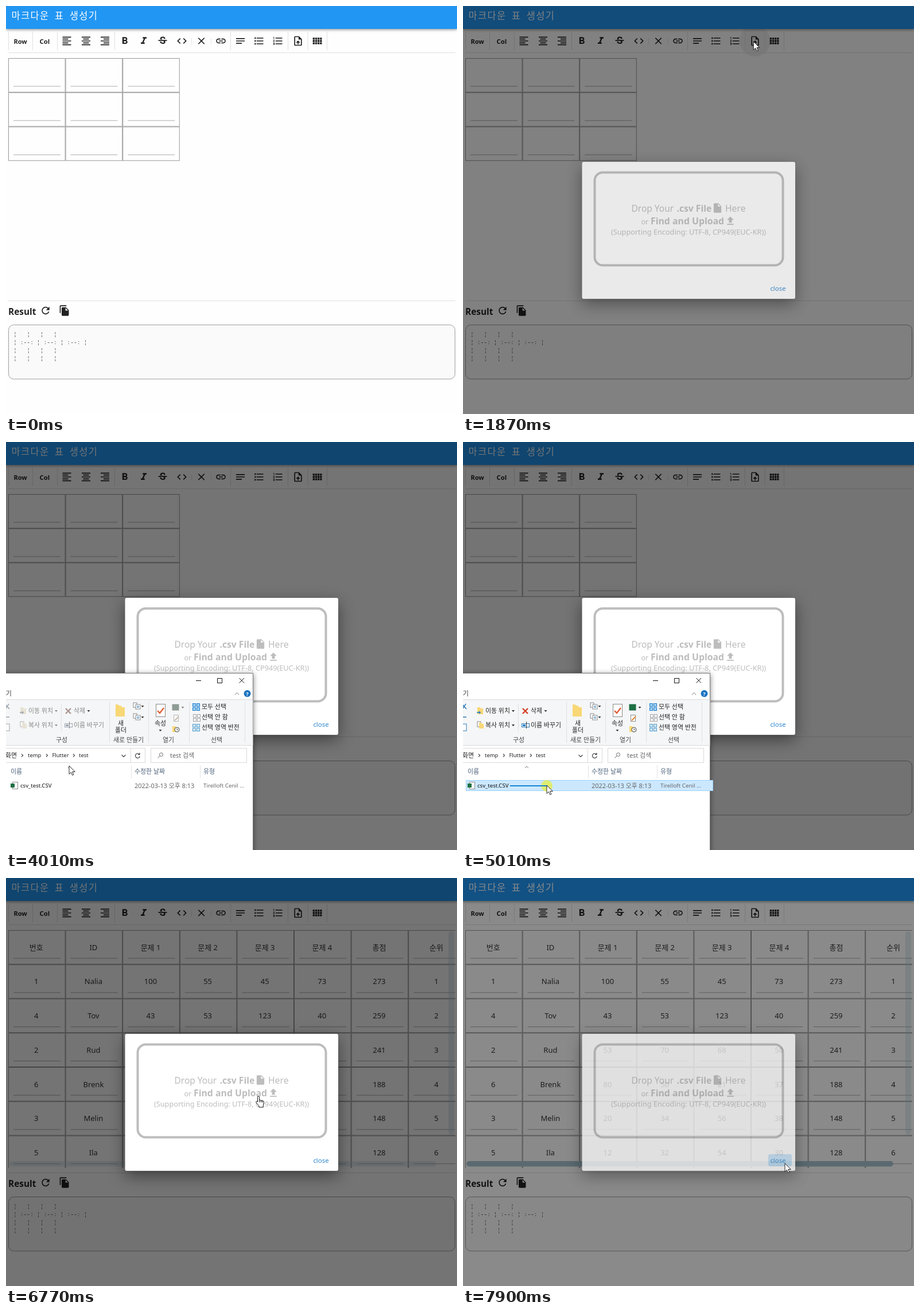
An HTML page that plays this animation: 786 px wide and 712 px high, repeating every 8 s.

```html
<!DOCTYPE html>
<html lang="ko">
<head>
<meta charset="utf-8">
<style>
  html, body { margin: 0; width: 100%; height: 100%; overflow: hidden; background: #fefefe; }
  svg { display: block; width: 100vw; height: 100vh; font-family: "Noto Sans", "Noto Sans CJK KR", sans-serif; }
  text { white-space: pre; }
  .bold { font-weight: 700; }
  .mid { text-anchor: middle; }
  .mono { font-family: "Noto Sans Mono", monospace; }
  .title { font-family: "Noto Sans CJK KR", sans-serif; letter-spacing: 1.3px; word-spacing: 3.5px; }
  .bar { filter: drop-shadow(0 2px 2px rgba(0,0,0,.35)); }
  .sheet { filter: drop-shadow(0 9px 14px rgba(0,0,0,.45)); }
  .frame { filter: drop-shadow(0 2px 5px rgba(0,0,0,.5)); }
  .label { fill: #888; }
  .tool { opacity: .6; filter: grayscale(.75); }
  .caption { stroke: #999; }
  .picked .label { fill: #222; }
  .picked .tool { opacity: 1; filter: none; }
  .active .caption { stroke: #111; }
</style>
</head>
<body>
<svg id="stage" viewBox="0 0 786 712"></svg>
<script>
const text = (x, y, size, str, cls = '', fill = '') =>
  `<text x="${x}" y="${y}" font-size="${size}" class="${cls}" ${fill && `fill="${fill}"`}>${str}</text>`;
const rect = (x, y, w, h, fill, attrs = '') =>
  `<rect x="${x}" y="${y}" width="${w}" height="${h}" fill="${fill}" ${attrs}/>`;
const line = (d, stroke, width = 1, attrs = '') =>
  `<path d="${d}" fill="none" stroke="${stroke}" stroke-width="${width}" ${attrs}/>`;
const shape = (d, fill, attrs = '') => `<path d="${d}" fill="${fill}" ${attrs}/>`;
const icon = (cx, cy, d) =>
  `<path transform="translate(${cx - 10} ${cy - 10}) scale(.833)" d="${d}"/>`;
const bars = list => list.map(([x, y, w, h = 2]) => `M${x} ${y}h${w}v${h}h${-w}z`).join('');
const group = (id, body, attrs = '') => `<g id="${id}" ${attrs}>${body}</g>`;

// ---- Page ----
const align = short => bars([0, 1, 2, 3, 4].map(i => i % 2 ? [short, 3 + 4 * i, 12] : [3, 3 + 4 * i, 18]));
const tools = [
  [106, align(3)], [139.5, align(6)], [172.5, align(9)],
  [207, 'M15.6 10.79c.97-.67 1.65-1.77 1.65-2.79 0-2.26-1.75-4-4-4H7v14h7.04c2.09 0 3.71-1.7 3.71-3.79 0-1.52-.86-2.82-2.15-3.42zM10 6.5h3c.83 0 1.5.67 1.5 1.5s-.67 1.5-1.5 1.5h-3v-3zm3.5 9H10v-3h3.5c.83 0 1.5.67 1.5 1.5s-.67 1.5-1.5 1.5z'],
  [240, 'M10 4v3h2.21l-3.42 8H6v3h8v-3h-2.21l3.42-8H18V4z'],
  [273, 'M6.85 7.08C6.85 4.37 9.45 3 12.24 3c1.64 0 3 .49 3.9 1.28.77.65 1.46 1.73 1.46 3.24h-3.01c0-.31-.05-.59-.15-.85-.29-.86-1.2-1.28-2.25-1.28-1.86 0-2.34 1.02-2.34 1.7 0 .48.25.88.74 1.21.38.25.77.48 1.41.7H7.39c-.21-.34-.54-.89-.54-1.92zM21 12v-2H3v2h9.62c1.15.45 1.96.75 1.96 1.97 0 1-.81 1.67-2.28 1.67-1.54 0-2.93-.54-2.93-2.51H6.4c0 .55.08 1.13.24 1.58.81 2.29 3.29 3.3 5.67 3.3 2.27 0 5.3-.89 5.3-4.05 0-.3-.01-1.16-.48-1.94H21V12z'],
  [306.5, 'M9.4 16.6L4.8 12l4.6-4.6L8 6l-6 6 6 6 1.4-1.4zm5.2 0l4.6-4.6-4.6-4.6L16 6l6 6-6 6-1.4-1.4z'],
  [340.5, 'M19 6.41L17.59 5 12 10.59 6.41 5 5 6.41 10.59 12 5 17.59 6.41 19 12 13.41 17.59 19 19 17.59 13.41 12z'],
  [374.5, 'M3.9 12c0-1.71 1.39-3.1 3.1-3.1h4V7H7c-2.76 0-5 2.24-5 5s2.24 5 5 5h4v-1.9H7c-1.71 0-3.1-1.39-3.1-3.1zM8 13h8v-2H8v2zm9-6h-4v1.9h4c1.71 0 3.1 1.39 3.1 3.1s-1.39 3.1-3.1 3.1h-4V17h4c2.76 0 5-2.24 5-5s-2.24-5-5-5z'],
  [408.5, bars([[3, 6, 18], [3, 11, 18], [3, 16, 12]])],
  [441, bars([5, 11, 17].flatMap(y => [[7, y, 14], [2.6, y - .4, 2.8, 2.8]]))],
  [474, 'M2 17h2v.5H3v1h1v.5H2v1h3v-4H2v1zm1-9h1V4H2v1h1v3zm-1 3h1.8L2 13.1v.9h3v-1H3.2L5 10.9V10H2v1z' + bars([[7, 5, 14], [7, 11, 14], [7, 17, 14]])],
  [509, 'M14 2H6c-1.1 0-1.99.9-1.99 2L4 20c0 1.1.89 2 1.99 2H18c1.1 0 2-.9 2-2V8l-6-6zm4 18H6V4h7v5h5v11zM8 15.01l1.41 1.41L11 14.84V19h2v-4.16l1.59 1.59L16 15.01 12.01 11z'],
  [543, bars([5, 10, 15].flatMap(y => [2, 7, 12, 17].map(x => [x, y, 4, 4])))],
];
const refreshIcon = 'M17.65 6.35C16.2 4.9 14.21 4 12 4c-4.42 0-7.99 3.58-7.99 8s3.57 8 7.99 8c3.73 0 6.84-2.55 7.73-6h-2.08c-.82 2.33-3.04 4-5.65 4-3.31 0-6-2.69-6-6s2.69-6 6-6c1.66 0 3.14.69 4.22 1.78L13 11h7V4l-2.35 2.35z';
const copyIcon = 'M16 1H4c-1.1 0-2 .9-2 2v14h2V3h12V1zm-1 4l6 6v10c0 1.1-.9 2-2 2H7.99C6.89 23 6 22.1 6 21V7c0-1.1.9-2 1.99-2h7zm-1 7h5.5L14 6.5V12z';
const fileIcon = 'M6 2c-1.1 0-1.99.9-1.99 2L4 20c0 1.1.89 2 1.99 2H18c1.1 0 2-.9 2-2V8l-6-6H6zm7 7V3.5L18.5 9H13z';
const uploadIcon = 'M9 16h6v-6h4l-7-7-7 7h4zm-4 2h14v2H5z';

const grid = rows => rows.map((row, r) => row.map((value, c) => {
  const x = 4.5 + 99.6 * c, y = 91.5 + 59.75 * r;
  return rect(x, y, 98.6, 58.75, 'none', 'stroke="#999"') +
    line(`M${x + 8.5} ${y + 48.7}h82`, '#bdbdbd', 1.2) +
    text(x + 48.3, y + 34, 13, value, 'mid', '#333');
}).join('')).join('');

const scores = [
  [1, 'Nalia', 100, 55, 45, 73], [4, 'Tov', 43, 53, 123, 40], [2, 'Rud', 53, 70, 68, 50],
  [6, 'Brenk', 80, 50, 21, 37], [3, 'Melin', 20, 34, 56, 38], [5, 'Ila', 12, 32, 54, 30],
];
const loaded = [
  ['번호', 'ID', '문제 1', '문제 2', '문제 3', '문제 4', '총점', '순위'],
  ...scores.map((row, i) => [...row, row.slice(2).reduce((a, b) => a + b), i + 1]),
];

const page =
  rect(0, 0, 786, 712, '#fefefe') +
  '<circle id="hover" cx="509" cy="61" r="27" opacity=".06"/>' +
  rect(0, -10, 786, 50, '#2196f3', 'class="bar"') +
  text(9.5, 23, 16.5, '마크다운 표 생성기', 'title', '#fff') +
  line('M4 81.5H783M4 514.5H783' + [4.5, 46.5, 89.5, 189.5, 391.5, 491.5, 526, 559.5].map(x => `M${x} 44v33`).join(''), '#e0e0e0') +
  line('M323.5 56v11M357.5 56v11', '#e4e4e4') +
  `<g fill="#212121">${text(13.5, 65.5, 11, 'Row', 'bold')}${text(58.5, 65.5, 11.3, 'Col', 'bold')}` +
  tools.map(([x, d]) => icon(x, 61, d)).join('') +
  text(4, 539, 15.4, 'Result', 'bold') + icon(69, 531.5, refreshIcon) + icon(102, 531.5, copyIcon) + '</g>' +
  group('empty', grid(Array(3).fill(['', '', '']))) +
  group('full', grid(loaded) +
    rect(771, 93, 10, 355, '#a5c4cf', 'rx="5" opacity=".3"') +
    rect(6, 494, 744, 9.5, '#a5c4cf', 'rx="5" id="scroll"'), 'clip-path="url(#view)"') +
  rect(4.5, 556.5, 778, 94.5, '#fafafa', 'rx="9" stroke="#9e9e9e"') +
  ['¦   ¦   ¦   ¦', '¦ :--: ¦ :--: ¦ :--: ¦', '¦   ¦   ¦   ¦', '¦   ¦   ¦   ¦']
    .map((row, i) => text(13, 575.5 + 14 * i, 9.73, row, 'mono', '#333')).join('');

// ---- Upload dialog ----
const dialog =
  rect(207.5, 272, 371.5, 239, '#fff', 'rx="3" class="sheet"') +
  rect(229.5, 290.5, 328, 162, 'none', 'rx="14" stroke="currentColor" stroke-width="4"') +
  '<g fill="currentColor">' +
  text(293.5, 358.5, 15.5, 'Drop Your') + text(372.5, 358.5, 15.7, '.csv File', 'bold') +
  icon(443.5, 352.5, fileIcon) + text(457, 358.5, 15.7, 'Here') +
  text(310.5, 381, 12.5, 'or') + text(327, 381, 15.8, 'Find and Upload', 'bold') + icon(466, 375, uploadIcon) +
  text(393, 399, 12.7, '(Supporting Encoding: UTF-8, CP949(EUC-KR))', 'mid') + '</g>' +
  rect(532, 482, 41, 21, '#2196f3', 'rx="3" id="press" opacity=".25"') +
  text(549, 497, 11.4, 'close', 'mid', '#2f87d0');

// ---- File window ----
const ko = (x, y, str, cls = '', fill = '#222') => text(x, y + 4, 10.9, str, cls, cls.includes('label') ? '' : fill);
const arrow = (x, y, cls = '') => shape(`M${x - 2.5} ${y - 1}h5l-2.5 3z`, cls ? '' : '#333', `class="${cls}"`);
const doc = (x, y, w, h, extra = '') => rect(x, y, w, h, '#fff', 'stroke="#8a8a8a"') + extra;
const folder = (x, y, w, h) => shape(`M${x} ${y}h${w * .45}l2 2H${x + w}v${h - 2}H${x}z`, '#f8d775');
const tiles = (x, y, fill, stroke) => [0, 7].flatMap(dx => [0, 7].map(dy =>
  rect(x + dx, y + dy, 5, 5, fill, `stroke="${stroke}"`))).join('');
const pages = y => doc(222, y - 6, 6, 8) + doc(226, y - 3, 8, 8) + line(`M228 ${y}h4m-4 2h4`, '#2a7ab8') + arrow(238, y);

const ribbon =
  rect(-20, 449.5, 450, 80, '#f5f6f7', 'stroke="#dadbdc"') +
  line('M96.5 457v48M180.5 453v72M248.5 453v72M319.5 453v72M416.5 453v72', '#dfe0e2') +
  '<g class="tool">' +
  line('M-2 457l8 9M5 457l-6 9M0 480h6', '#2a7ab8', 1.5) + rect(-5, 492, 11, 12, '#fff', 'stroke="#2a7ab8"') +
  folder(25, 463, 10, 12) + line('M24 472h6l-2-2m2 2l-2 2', '#1979ca', 1.3) +
  doc(25, 488, 6, 9) + folder(28, 490, 8, 10) +
  line('M104 465l9 9m0-9l-9 9', '#d43f23', 2.4) +
  rect(102.5, 491.5, 13, 6, '#fff', 'stroke="#2a7ab8"') + rect(104, 493, 5, 3, '#1979ca') + line('M110.5 488v12', '#333') +
  rect(289.5, 457.5, 12, 11, '#1d7044') + arrow(308, 463) +
  doc(292.5, 476.5, 8, 11) + line('M294 486l7-7', '#e08a2c', 2) + '</g>' +
  ko(39, 469, '이동 위치', 'label') + arrow(87.5, 469, 'label') + ko(39, 494, '복사 위치', 'label') + arrow(87.5, 494, 'label') +
  ko(118, 469, '삭제', 'label') + arrow(144, 469) + ko(118, 494, '이름 바꾸기', 'label') +
  folder(191, 458, 9, 21) + folder(196, 461, 11, 18) +
  ko(200, 491, '새', 'mid') + ko(200, 502.5, '폴더', 'mid') + pages(461) + pages(480) +
  doc(261.5, 457.5, 16, 22) + line('M264 469l4 4 7-9', '#e0582c', 2.2) + ko(269, 491, '속성', 'mid') + arrow(269, 503) +
  folder(290, 496, 11, 10) + '<circle cx="298" cy="502" r="4" fill="#fff" stroke="#444"/>' + line('M298 500v2h2', '#444') +
  tiles(325.5, 456.5, '#9fd4f5', '#1979ca') + tiles(326.5, 475.5, '#fff', '#a0a0a0') + tiles(325.5, 492.5, '#cde9fa', '#5a9cc8') +
  ko(341, 462, '모두 선택') + ko(341, 480, '선택 안 함') + ko(341, 498, '선택 영역 반전') +
  [[97, '구성'], [213.5, '새로 만들기'], [283, '열기'], [367, '선택']].map(([x, s]) => ko(x, 520, s, 'mid', '#444')).join('');

const files =
  rect(-20, 403.5, 450.5, 330, '#fff', 'stroke="#777" class="frame"') +
  line('M331 416.5h9M368.5 412.5h8v8h-8zM406.5 412l8.5 8.5m0-8.5l-8.5 8.5', '', 1, 'class="caption"') +
  text(10, 442.5, 11, '보기', '', '#333').replace('<text', '<text text-anchor="end"') +
  line('M399 441l3.5-3.5 3.5 3.5', '#777') +
  '<circle cx="420.5" cy="439" r="6" fill="#1a73c0"/>' + text(420.5, 442.5, 9.5, '?', 'mid bold', '#fff') +
  ribbon +
  line('M-9 534.5H242.5V559.5H-9M217.5 535v24M252.5 534.5h167v25h-167z', '#d9d9d9') +
  ko(-1, 547, '화면') +
  [[38, 'temp'], [80.5, 'Flutter'], [127, 'test']].map(([x, s]) => text(x, 550, 9.4, s, '', '#222')).join('') +
  line([27, 70, 117].map(x => `M${x} 544.5l2.5 2.5-2.5 2.5`).join('') + 'M201.5 546l3.5 3.5 3.5-3.5', '#444', 1.2) +
  line('M232.5 545a4 4 0 1 0 .8 3.5M233 542.5v3h-3', '#444', 1.2) +
  '<circle cx="270.5" cy="545.5" r="3" fill="none" stroke="#666"/>' + line('M268 548l-3.5 3.5', '#666') +
  ko(286, 547, 'test 검색', '', '#666') +
  rect(0, 564, 218, 24, '#d9ebf9', 'id="head"') +
  line('M108 569l3-3 3 3', '#777') + line('M218.5 564v23M338.5 564v23', '#e2e2e2') +
  ko(8, 575, '이름', '', '#4c607a') + ko(224, 575, '수정한 날짜', '', '#4c607a') + ko(344, 575, '유형', '', '#4c607a') +
  rect(5.5, 590.5, 430, 18, '#e5f3ff', 'id="row"') +
  doc(11.5, 593.5, 9, 12) + rect(8, 596, 7, 7, '#1d7044') +
  text(25, 603, 9.6, 'csv_test.CSV', '', '#111') +
  ko(224, 599.5, '2022-03-13 오후 8:13', '', '#666') + text(344, 603, 9.8, 'Tirelloft Cenil ...', '', '#666');

const pointer =
  shape('M0 0V14.5L3.4 11.4 5.6 16.5 7.9 15.5 5.7 10.5H10.3Z', '#fff', 'id="arrow" stroke="#111" stroke-width=".9"') +
  shape('M-1.6 10V1.4a1.6 1.6 0 0 1 3.2 0V6.4l6 1.4q2 .6 1.9 2.6l-1.2 5.8v2.8h-7.5v-2.3l-4.8-5.8q-1.1-1.7.4-2.3 1.2-.3 2 1.4zM1.6 6.5v4M4.4 7.2v3.4M7 7.8v3', '#fff', 'id="hand" stroke="#111"');

const stage = document.getElementById('stage');
stage.innerHTML = '<clipPath id="view"><path d="M4 90H783V506H4z"/></clipPath>' + page +
  rect(0, 0, 786, 712, '#000', 'id="barrier"') + group('dialog', dialog) + group('files', files) +
  '<circle id="click" r="10" fill="#e4ee4e" opacity=".8"/>' +
  line('', '#1583d8', 2, 'id="trail"') + group('cursor', pointer);

// ---- Timeline ----
const $ = id => document.getElementById(id);
const set = (id, name, value) => $(id).setAttribute(name, value);
const show = (id, on) => set(id, 'visibility', on ? 'inherit' : 'hidden');
const moves = [
  [875, 677, 694], [1250, 440, 285], [1375, 367, 150], [1500, 425, 96], [1625, 507, 62], [2000, 506, 62],
  [2500, -6, 386], [3750, 20, 577], [3875, 60, 543], [4000, 110, 565], [4250, 146, 599],
  [5500, 146, 599], [6000, 440, 381], [7000, 440, 381], [7500, 561, 498], [8000, 561, 498],
];

function position(t) {
  const i = Math.max(1, moves.findIndex(m => m[0] > t));
  const [t0, x0, y0] = moves[i - 1], [t1, x1, y1] = moves[i];
  const k = Math.max(0, (t - t0) / (t1 - t0));
  return [x0 + (x1 - x0) * k, y0 + (y1 - y0) * k];
}

function draw(now) {
  const t = Math.floor((now % 8000 + 5) / 125) * 125;
  const during = (from, to) => t >= from && t < to;
  const [x, y] = position(t);

  show('hover', during(1750, 2125));
  show('empty', t < 6750);
  show('full', t >= 6750);
  set('scroll', 'opacity', t >= 7875 ? 1 : .3);

  const opening = during(1875, 2000), closing = t >= 7875;
  show('barrier', t >= 1875);
  set('barrier', 'opacity', opening ? .495 : closing ? .46 : .54);
  show('dialog', t >= 1875);
  set('dialog', 'opacity', opening ? .84 : closing ? .74 : 1);
  set('dialog', 'color', during(5875, 6375) ? '#9e9e9e' : '#bdbdbd');
  show('press', t >= 7500);

  const picked = t >= 4625;
  show('files', during(3000, 6375));
  set('files', 'class', (t >= 3125 ? 'active ' : '') + (picked ? 'picked' : ''));
  show('head', t === 3750);
  show('row', during(4125, 6375));
  set('row', 'fill', picked ? '#cce8ff' : '#e5f3ff');
  set('row', 'stroke', picked ? '#99d1ff' : 'none');

  show('click', during(4625, 6375));
  set('click', 'cx', x);
  set('click', 'cy', y + 1);
  show('trail', during(4875, 5500));
  set('trail', 'd', `M${t < 5250 ? 82 : 82 + (t - 5125) * .17} 600H147`);

  const hand = during(1625, 1875) || during(6375, 7375) || during(7500, 7875);
  show('cursor', during(875, 2625) || during(3750, 8000));
  set('cursor', 'transform', `translate(${x} ${y})`);
  show('arrow', !hand);
  show('hand', hand);
}

const start = performance.now();
(function tick() {
  draw(performance.now() - start);
  requestAnimationFrame(tick);
})();
</script>
</body>
</html>
```
